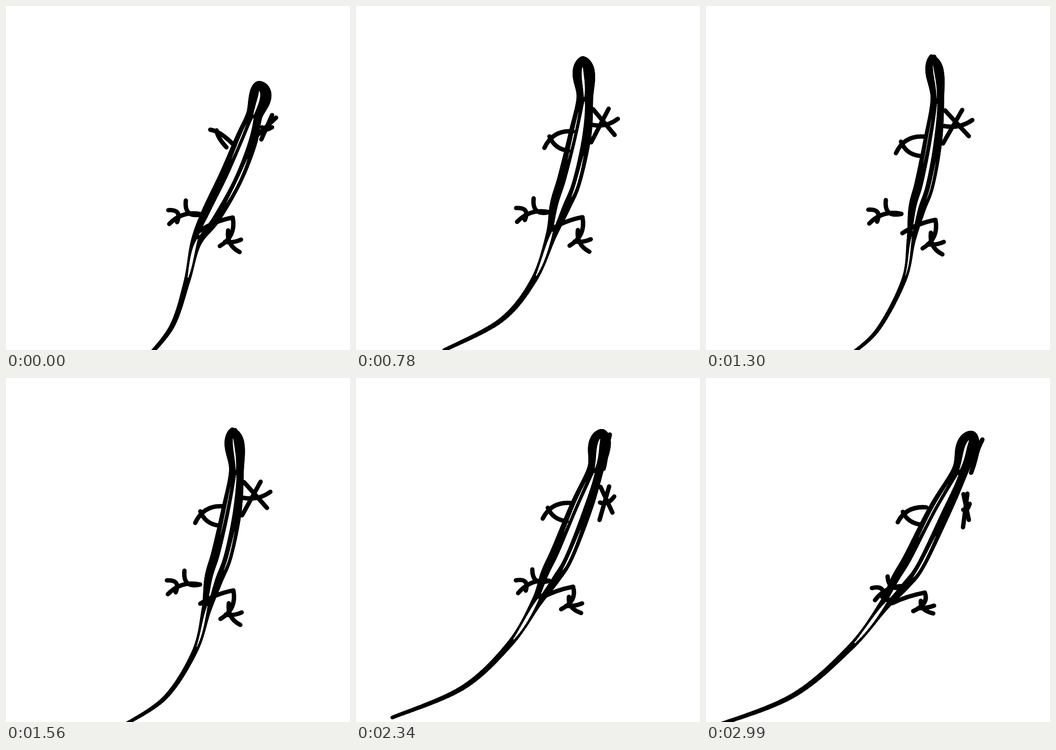
Animation, 748 px wide and 748 px high, one loop 3120 ms. Source, as an HTML page with a canvas:

```html
<!DOCTYPE html>
<html lang="en">
<head>
<meta charset="utf-8">
<title>Walking lizard</title>
<style>
  html, body { margin: 0; width: 100%; height: 100%; overflow: hidden; background: #fff; }
  canvas { display: block; }
</style>
</head>
<body>
<canvas id="stage" width="748" height="748"></canvas>
<script>
const STEP = 130, STEPS = 24, LINE = 9.5;
const ctx = document.getElementById('stage').getContext('2d');
ctx.lineCap = ctx.lineJoin = 'round';

// Body thickness at the ten joints of the spine, snout to tail tip
const girth = [10, 48, 36, 50, 53, 46, 24, 14, 11, 8];

// White lines on the body: first joint, last joint, side (-1 left, 1 right), width
const slits = [
  [0.7, 2, -0.1, 5],
  [2.1, 5.8, 0, 14],
  [5.9, 6.95, 0, 7],
  [2.4, 3.6, -0.55, 2],
  [3.4, 4.6, 0.65, 3]
];

// Strokes around the foot: x1, y1, x2, y2, bend
const limbs = [
  [[38, -20, -24, 16, 0.35], [-13, -9, 28, 22, 0.3]],
  [[-26, 23, 30, -24, 0], [8, 25, -5, -31, 0.23], [46, 27, -27, -11, 0]],
  [[47, -4, -23, 17, 0.28], [-25, -13, -6, 13, -0.8], [13, -34, 47, -4, 0.7]],
  [[-63, -14, 9, -43, -0.1], [9, -43, -19, 19, -0.35], [-1, -15, 24, 32, 0.35], [27, 5, -8, 10, -0.15]]
];

// Feet: x, y, turn in degrees, spread. Brow is the distance of the line beside the head.
const turning = {
  spine: [[548, 170], [553, 195], [539, 240], [520, 298], [488, 375],
          [446, 455], [413, 515], [393, 600], [360, 698], [300, 772]],
  feet: [[465, 282, 45, 0.35], [568, 262, 128, 0.3], [378, 457, 0, 1], [484, 503, 0, 1]],
  build: [1, 6]
};
const sprawled = {
  spine: [[508, 119], [510, 150], [512, 207], [500, 290], [477, 385],
          [457, 440], [436, 507], [397, 605], [325, 692], [200, 757]],
  feet: [[447, 298, 0, 1], [553, 256, 90, 1], [385, 459, 0, 1], [496, 510, 0, 1]],
  build: [1, 6]
};
const stretched = {
  spine: [[490, 110], [497, 142], [503, 205], [492, 300], [475, 388],
          [459, 440], [446, 510], [430, 597], [371, 707], [300, 768]],
  feet: [[437, 304, 0, 1], [545, 253, 90, 1.1], [378, 456, 0, 1], [490, 508, 0, 1]],
  build: [0.82, 6]
};
const leaning = {
  spine: [[563, 118], [552, 143], [535, 198], [490, 285], [440, 386],
          [412, 428], [375, 480], [303, 570], [180, 672], [8, 738]],
  feet: [[428, 290, 0, 0.9], [549, 270, 90, 0.25], [376, 450, -10, 0.9], [455, 479, -4, 0.62]],
  build: [1, 24]
};

// Moves, turns and scales a whole pose about its snout
function place({ spine, feet, build }, dx = 0, dy = 0, turn = 0, scale = 1) {
  const [px, py] = spine[0];
  const c = Math.cos(turn) * scale, s = Math.sin(turn) * scale;
  const move = ([x, y, ...rest]) =>
    [px + dx + (x - px) * c - (y - py) * s, py + dy + (x - px) * s + (y - py) * c, ...rest];
  return { spine: spine.map(move), feet: feet.map(move), build };
}

const keys = [
  { at: 0, pose: place(turning) },
  { at: 2, pose: place(sprawled) },
  { at: 6, pose: place(sprawled, -15, -4, -0.006, 0.99) },
  { at: 10, pose: place(stretched) },
  { at: 15, pose: place(sprawled, -13, -2, 0.012, 0.98) },
  { at: 20, pose: place(leaning) },
  { at: 23, pose: place(leaning, 17, 4, 0, 1.03) }
];

const blend = (a, b, k) =>
  Array.isArray(a) ? a.map((v, i) => blend(v, b[i], k)) : a + (b - a) * k;

// Catmull-Rom curve through a list of points
function pointAt(points, u) {
  const last = points.length - 1;
  u = Math.max(0, Math.min(last - 1e-6, u));
  const i = Math.floor(u), t = u - i;
  const [a, b, c, d] = [-1, 0, 1, 2].map(n => points[Math.max(0, Math.min(last, i + n))]);
  return b.map((v, j) => v + t / 2 * (c[j] - a[j] + t * (2 * a[j] - 5 * v + 4 * c[j] - d[j]
    + t * (3 * (v - c[j]) + d[j] - a[j]))));
}

// Line along the spine; look(girth, t) gives its sideways offset and its width
function trail(spine, from, to, color, look) {
  const count = Math.ceil((to - from) * 14);
  ctx.strokeStyle = color;
  let last;
  for (let n = 0; n <= count; n++) {
    const t = n / count, u = from + (to - from) * t;
    const [x, y, size] = pointAt(spine, u);
    const [x1, y1] = pointAt(spine, u - 0.02), [x2, y2] = pointAt(spine, u + 0.02);
    const length = Math.hypot(x2 - x1, y2 - y1);
    const [offset, width] = look(size, t);
    const next = [x + (y2 - y1) / length * offset, y - (x2 - x1) / length * offset];
    if (last && width > 0.3) {
      ctx.lineWidth = width;
      ctx.beginPath();
      ctx.moveTo(...last);
      ctx.lineTo(...next);
      ctx.stroke();
    }
    last = next;
  }
}

function drawLimb(strokes, [x, y, turn, spread]) {
  ctx.save();
  ctx.translate(x, y);
  ctx.rotate(turn * Math.PI / 180);
  ctx.scale(1, spread);
  ctx.beginPath();
  for (const [x1, y1, x2, y2, bend] of strokes) {
    ctx.moveTo(x1, y1);
    ctx.quadraticCurveTo((x1 + x2) / 2 - (y2 - y1) * bend, (y1 + y2) / 2 + (x2 - x1) * bend, x2, y2);
  }
  ctx.restore();
  ctx.strokeStyle = '#000';
  ctx.lineWidth = LINE;
  ctx.stroke();
}

function draw(step) {
  const index = keys.findLastIndex(key => key.at <= step);
  const from = keys[index], to = keys[index + 1] || from;
  const k = (step - from.at) / (to.at - from.at || 1);
  const [spread, brow] = blend(from.pose.build, to.pose.build, k);
  const feet = blend(from.pose.feet, to.pose.feet, k);
  const spine = blend(from.pose.spine, to.pose.spine, k).map((p, i) => [...p, girth[i] * spread]);

  ctx.fillStyle = '#fff';
  ctx.fillRect(0, 0, 748, 748);
  trail(spine, 0, girth.length - 1, '#000', size => [0, size]);
  for (const [start, end, side, width] of slits) {
    trail(spine, start, end, '#fff', (size, t) =>
      [side * size / 2, width * spread ** 4 * Math.sin(Math.PI * t) ** 0.7]);
  }
  trail(spine, 0.1, 1.9, '#000', () => [brow, LINE]);
  limbs.forEach((strokes, i) => drawLimb(strokes, feet[i]));
}

const start = performance.now();
function tick() {
  draw(Math.floor((performance.now() - start) / STEP) % STEPS);
  requestAnimationFrame(tick);
}
tick();
</script>
</body>
</html>
```
